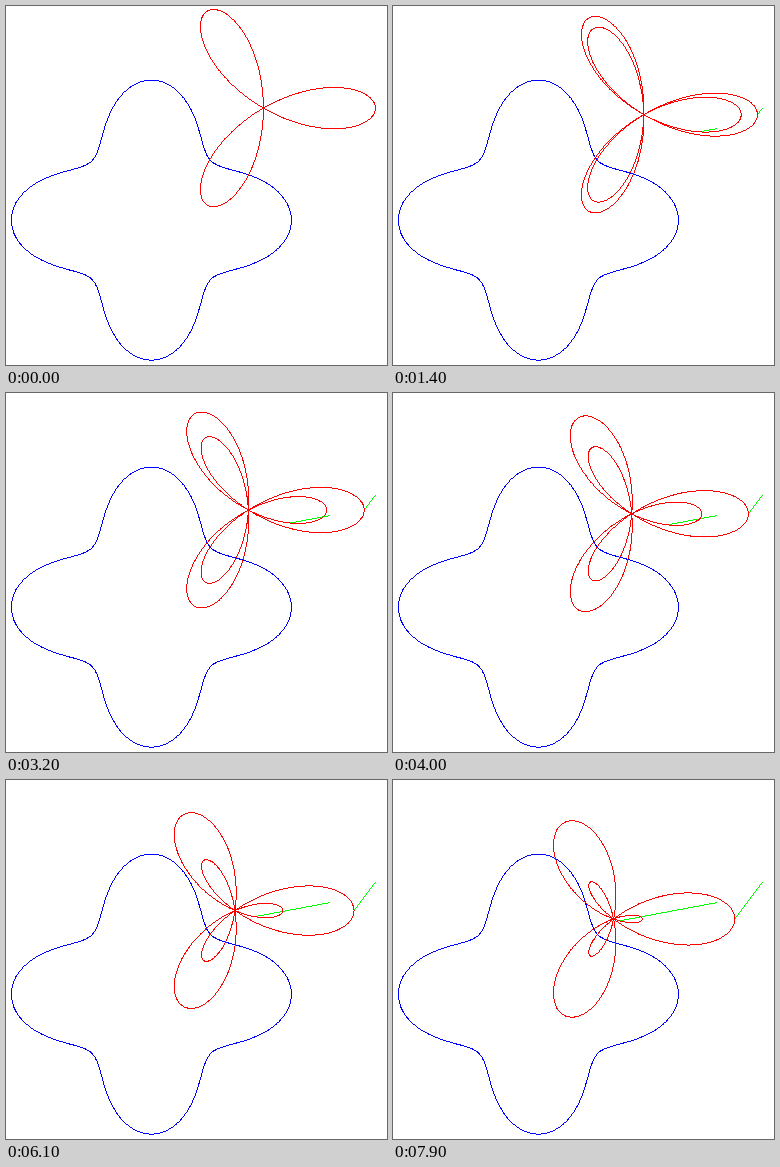
These frames come from a looping animation (381x359 px, 8 s). An HTML page with a canvas:

```html
<!DOCTYPE html>
<html lang="en">
<head>
<meta charset="utf-8">
<title>Rose morph</title>
<style>
  html, body { margin: 0; width: 100%; height: 100%; overflow: hidden; background: #fff; }
  canvas { display: block; }
</style>
</head>
<body>
<canvas id="stage" width="381" height="359"></canvas>
<script>
const ctx = document.getElementById('stage').getContext('2d');
const CX = 144.9, CY = 213.6, UNIT = 28;
const STEP_MS = 100, STEPS = 80, FULL_STEPS = 240;
const SAMPLES = 400;
const MARKED = [0, 2.84];

// Blend from the shifted rose 4cos(3a) at s = 0 to the curve 4 + cos(4a) at s = 1.
function point(a, s) {
  const shift = 4 * (1 - s);
  const r = shift * Math.cos(3 * a) + s * (4 + Math.cos(4 * a));
  return [
    CX + UNIT * (shift + r * Math.cos(a)),
    CY - UNIT * (shift + r * Math.sin(a))
  ];
}

// One pixel wide line without smoothing.
function line(p, q) {
  const major = Math.abs(q[0] - p[0]) >= Math.abs(q[1] - p[1]) ? 0 : 1;
  const minor = 1 - major;
  if (p[major] > q[major]) [p, q] = [q, p];
  const span = q[major] - p[major];
  if (!span) return;
  const slope = (q[minor] - p[minor]) / span;
  const end = Math.round(q[major]);
  for (let i = Math.round(p[major]); i <= end; i++) {
    const at = Math.min(Math.max(i, p[major]), q[major]);
    const j = Math.round(p[minor] + (at - p[major]) * slope);
    if (major === 0) ctx.fillRect(i, j, 1, 1);
    else ctx.fillRect(j, i, 1, 1);
  }
}

function curve(s, color) {
  ctx.fillStyle = color;
  let prev = point(0, s);
  for (let k = 1; k <= SAMPLES; k++) {
    const next = point(2 * Math.PI * k / SAMPLES, s);
    line(prev, next);
    prev = next;
  }
}

function draw(s) {
  ctx.fillStyle = '#fff';
  ctx.fillRect(0, 0, 381, 359);
  curve(1, '#00f');
  ctx.fillStyle = '#0f0';
  for (const a of MARKED) line(point(a, 0), point(a, s));
  curve(s, '#f00');
}

let shown = -1;
function tick() {
  const step = Math.floor(performance.now() / STEP_MS) % STEPS;
  if (step !== shown) {
    shown = step;
    draw(step / FULL_STEPS);
  }
  requestAnimationFrame(tick);
}
tick();
</script>
</body>
</html>
```
